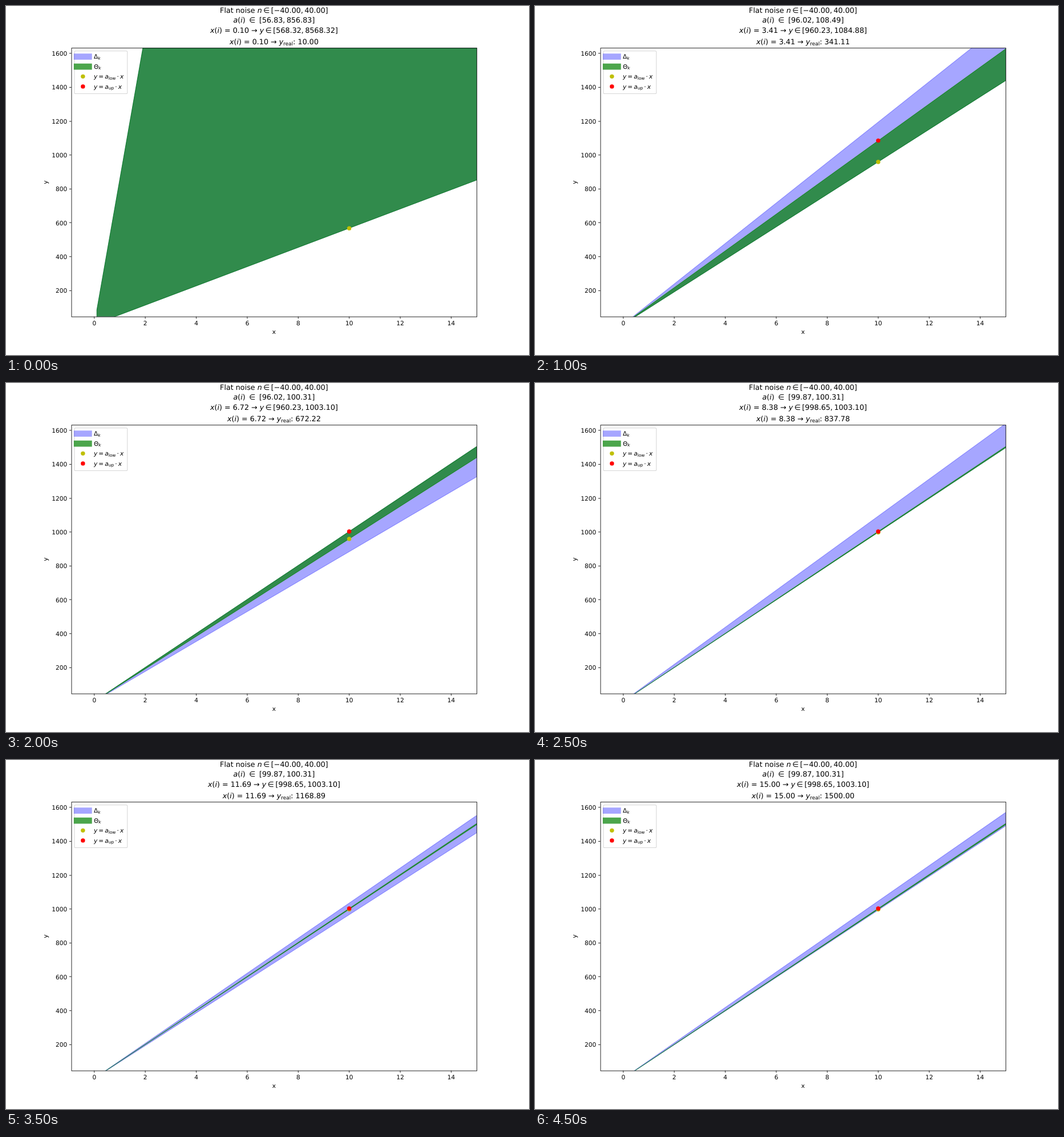
Animation, 917 px wide and 611 px high, one loop 5 s. Source, as an HTML page with a canvas:

```html
<!DOCTYPE html>
<html lang="en">
<head>
<meta charset="utf-8">
<title>Flat noise bounds</title>
<style>
  html, body { margin: 0; width: 100%; height: 100%; overflow: hidden; background: #fff; }
  canvas { display: block; }
</style>
</head>
<body>
<canvas id="stage" width="917" height="611"></canvas>
<script>
// The figure is laid out on 1200 x 800 units (100 per inch) and scaled to the stage.
const ctx = document.getElementById('stage').getContext('2d');
ctx.scale(917 / 1200, 611 / 800);
ctx.textRendering = 'geometricPrecision';

const POINT = 100 / 72;
const SMALL = 10 * POINT, LARGE = 12 * POINT;
const STEP_MS = 500, STEPS = 10, NOISE = 40, FIRST_X = 0.1, LAST_X = 15;
const box = { left: 150, right: 1080, top: 96, bottom: 712 };
const limits = { left: -0.9, right: 15, bottom: 45.68, top: 1633 };
const REL = 0.195; // space around relations and after commas, in em
const BLUE = 'rgba(0,0,255,.35)', GREEN = 'rgba(0,128,0,.7)';
const YELLOW = '#bfbf00', RED = '#f00';

const px = x => box.left + (x - limits.left) / (limits.right - limits.left) * (box.right - box.left);
const py = y => box.bottom - (y - limits.bottom) / (limits.top - limits.bottom) * (box.bottom - box.top);
const snap = v => Math.floor(v) + 0.5;

// Each measurement bounds the slope; the estimate is the running intersection.
const slopeLows = [56.832, 62.918, 96.023, 94.36, 88.409, 99.8652, 98.1, 96.67, 95.57, 99.38];
let low = -Infinity, up = Infinity;
const states = slopeLows.map((measuredLow, k) => {
  const x = FIRST_X + k * (LAST_X - FIRST_X) / (STEPS - 1);
  const measuredUp = measuredLow + 2 * NOISE / x;
  low = Math.max(low, measuredLow);
  up = Math.min(up, measuredUp);
  return { x, measuredLow, measuredUp, low, up };
});

function line(x1, y1, x2, y2, color, width, cap = 'butt') {
  ctx.strokeStyle = color;
  ctx.lineWidth = width;
  ctx.lineCap = cap;
  ctx.beginPath();
  ctx.moveTo(x1, y1);
  ctx.lineTo(x2, y2);
  ctx.stroke();
}

function dot(x, y, color) {
  ctx.fillStyle = color;
  ctx.beginPath();
  ctx.arc(snap(x), snap(y), 3.5 * POINT, 0, 2 * Math.PI);
  ctx.fill();
}

function wedge(a, b, color) {
  ctx.beginPath();
  ctx.moveTo(px(FIRST_X), py(a * FIRST_X));
  ctx.lineTo(px(LAST_X), py(a * LAST_X));
  ctx.lineTo(px(LAST_X), py(b * LAST_X));
  ctx.lineTo(px(FIRST_X), py(b * FIRST_X));
  ctx.closePath();
  ctx.fillStyle = ctx.strokeStyle = color;
  ctx.lineWidth = POINT;
  ctx.fill();
  ctx.stroke();
}

function label(text, x, y, align = 'center') {
  ctx.font = `${SMALL}px "DejaVu Sans", sans-serif`;
  ctx.fillStyle = '#000';
  ctx.textAlign = align;
  ctx.fillText(text, x, y);
}

// Runs are gaps in em or [text, style]; style holds i (italic) and s (subscript).
function math(runs, x, y, size, centered) {
  const pieces = [];
  let width = 0;
  for (const run of runs) {
    if (typeof run === 'number') { width += run * size; continue; }
    const [text, style = ''] = run;
    const sub = style.includes('s');
    const font = `${style.includes('i') ? 'italic ' : ''}${sub ? size * 0.7 : size}px "DejaVu Sans", sans-serif`;
    ctx.font = font;
    pieces.push({ text, font, x: width, y: sub ? size * 0.17 : 0 });
    width += ctx.measureText(text).width;
  }
  ctx.fillStyle = '#000';
  ctx.textAlign = 'left';
  const start = centered ? x - width / 2 : x;
  for (const piece of pieces) {
    ctx.font = piece.font;
    ctx.fillText(piece.text, start + piece.x, y + piece.y);
  }
}

const range = (a, b) => [REL, ['∈'], REL, [`[${a},`], REL, [`${b}]`]];
const indexed = name => [[name, 'i'], ['('], ['i', 'i'], [')']];

function title({ x, low, up }) {
  const f = v => v.toFixed(2);
  const input = [...indexed('x'), [` = ${f(x)} → `], ['y', 'i']];
  const row = (y, ...runs) => math(runs, 615, y, LARGE, true);
  row(16.3, ['Flat noise '], ['n', 'i'], ...range('−40.00', '40.00'));
  row(38.5, ...indexed('a'), [' '], REL, ['∈'], REL, [` [${f(low)},`], REL, [`${f(up)}]`]);
  row(61.5, ...input, ...range(f(10 * low), f(10 * up)));
  row(87.7, ...input, ['real', 's'], [`: ${f(100 * x)}`]);
}

function axes() {
  const width = 0.8 * POINT, tickLength = 3.5 * POINT;
  for (let x = 0; x <= 14; x += 2) {
    const tx = snap(px(x));
    line(tx, box.bottom, tx, box.bottom + tickLength, '#000', width);
    label(x, px(x), 732);
  }
  for (let y = 200; y <= 1600; y += 200) {
    const ty = snap(py(y));
    line(box.left - tickLength, ty, box.left, ty, '#000', width);
    label(y, box.left - 2 * tickLength, py(y) + 5.3, 'right');
  }
  ctx.strokeStyle = '#000';
  ctx.lineWidth = width;
  ctx.strokeRect(snap(box.left), snap(box.top), box.right - box.left, box.bottom - box.top);
  label('x', 615, 751.5);
  ctx.save();
  ctx.translate(96, 404);
  ctx.rotate(-Math.PI / 2);
  label('y', 0, 0);
  ctx.restore();
}

function legend() {
  ctx.beginPath();
  ctx.roundRect(157, 103, 121.5, 98, 2.8);
  ctx.fillStyle = 'rgba(255,255,255,.8)';
  ctx.strokeStyle = 'rgba(204,204,204,.8)';
  ctx.lineWidth = POINT;
  ctx.fill();
  ctx.stroke();
  const rowY = i => 116 + 22.9 * i;
  const swatch = (i, color) => line(162.5, rowY(i), 190.3, rowY(i), color, 10 * POINT, 'square');
  const text = (i, ...runs) => math(runs, 201.4, rowY(i) + 4.6, SMALL);
  const bound = name => [['y', 'i'], REL, ['='], REL, ['a', 'i'], [name, 's'], REL, ['⋅'], REL, ['x', 'i']];
  swatch(0, BLUE);
  swatch(1, GREEN);
  dot(176.4, rowY(2), YELLOW);
  dot(176.4, rowY(3), RED);
  text(0, ['Δ'], ['k', 'is']);
  text(1, ['Θ'], ['k', 'is']);
  text(2, ...bound('low'));
  text(3, ...bound('up'));
}

function draw(now) {
  const state = states[Math.floor(now / STEP_MS) % STEPS];
  ctx.fillStyle = '#fff';
  ctx.fillRect(0, 0, 1200, 800);
  ctx.save();
  ctx.beginPath();
  ctx.rect(box.left, box.top, box.right - box.left, box.bottom - box.top);
  ctx.clip();
  wedge(state.measuredLow, state.measuredUp, BLUE);
  wedge(state.low, state.up, GREEN);
  dot(px(10), py(10 * state.low), YELLOW);
  dot(px(10), py(10 * state.up), RED);
  ctx.restore();
  axes();
  legend();
  title(state);
}

const start = performance.now();
function tick() {
  draw(performance.now() - start);
  requestAnimationFrame(tick);
}
tick();
</script>
</body>
</html>
```
